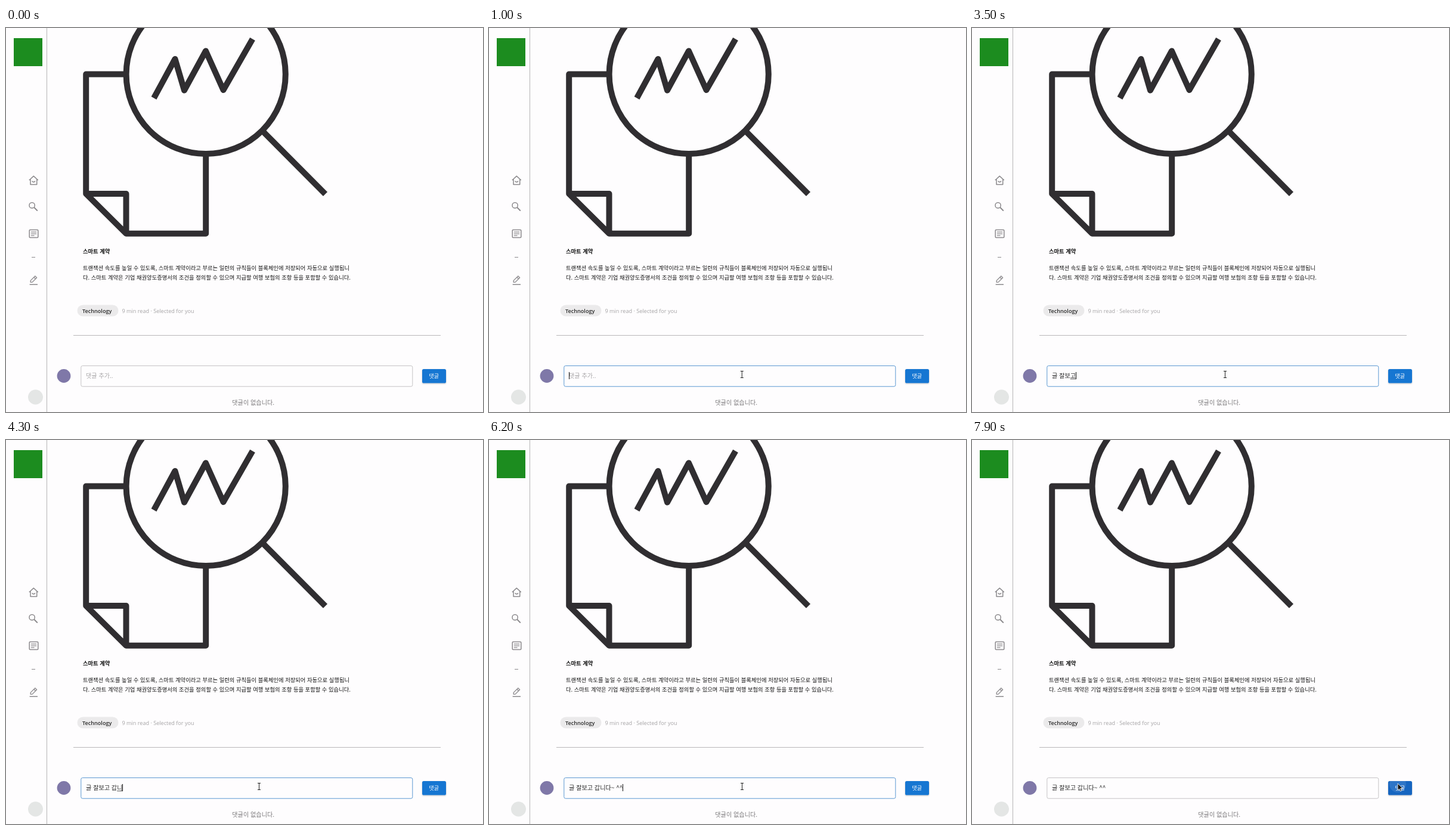
These frames come from a looping animation (800 by 644 pixels, 8 s). An HTML page:

```html
<!DOCTYPE html>
<html lang="ko">
<head>
<meta charset="utf-8">
<style>
  html, body { margin: 0; width: 100%; height: 100%; overflow: hidden; background: #fefdfe; }
  svg { display: block; font-family: "Noto Sans CJK KR", "Noto Sans CJK", sans-serif; }
  text { white-space: pre; }
  .latin { font-family: "Open Sans", "Noto Sans", sans-serif; font-size: 9.1px; }
  .body { font-size: 9.3px; fill: #111; }
  .field { font-size: 10.12px; }
  .art { fill: none; stroke: #302e31; stroke-width: 10; stroke-linejoin: round; }
  .icons { fill: none; stroke: #8b898c; stroke-width: 1.5; stroke-linejoin: round; }
</style>
</head>
<body>
<svg width="800" height="644" viewBox="0 0 800 644">
  <defs>
    <clipPath id="buttonClip"><rect x="698" y="572" width="40" height="23.5" rx="2.6"/></clipPath>
    <filter id="shadow" x="-20%" y="-20%" width="140%" height="160%">
      <feDropShadow dx="0" dy="1" stdDeviation=".8" flood-opacity=".25"/>
    </filter>
  </defs>

  <!-- sidebar -->
  <path d="M68.5 0V644" stroke="#b5b3b5"/>
  <rect x="13" y="17" width="48" height="47" fill="#1c8c1f"/>
  <g class="icons">
    <path d="M38.8 255.3 46.3 248.4 53.8 255.3M41 254V262.6H51.7V254M43.7 256.8Q46.3 260.3 49 256.8"/>
    <circle cx="43.6" cy="297.4" r="4.6"/>
    <path d="M47 300.8 52.8 306.6" stroke-width="2"/>
    <rect x="39.2" y="338.5" width="14.6" height="13" rx="1.2"/>
    <path d="M41.8 342.2H51.2M41.8 345.2H51.2M41.8 348.2H47.6" stroke-width="1.3"/>
    <path d="M43 384.5H49" stroke-width="1"/>
    <path d="M41.2 426.4V423.6L48.8 416 51.6 418.8 44 426.4ZM46.8 418 49.6 420.8" stroke-width="1.3"/>
    <path d="M39.6 430.2H53"/>
  </g>
  <circle cx="49.5" cy="619" r="12.5" fill="#e4e6e5"/>

  <!-- article -->
  <g class="art">
    <circle cx="335.2" cy="77.5" r="133.6"/>
    <path d="M202 77.5H134.2V278H201.5V344.8H335.2V211M134.2 278 201.5 344.8"/>
    <path d="M431.5 174 535.5 278.5"/>
    <path d="M248 117.5 283.5 52 299 104.5 335 38.5 364.5 104 413.5 18.5"/>
  </g>
  <text class="body" x="129" y="378" font-weight="700">스마트 계약</text>
  <text class="body" x="129" y="405.8">트랜잭션 속도를 높일 수 있도록, 스마트 계약이라고 부르는 일련의 규칙들이 블록체인에 저장되어 자동으로 실행됩니</text>
  <text class="body" x="129" y="422">다. 스마트 계약은 기업 채권양도증명서의 조건을 정의할 수 있으며 지급할 여행 보험의 조항 등을 포함할 수 있습니다.</text>
  <rect x="119.5" y="464.5" width="69" height="19" rx="9.5" fill="#ebeaeb"/>
  <text class="latin" x="128" y="477.8" font-weight="600" fill="#2b2b2b">Technology</text>
  <text class="latin" x="194.5" y="477.8" fill="#a5a3a5">9 min read · Selected for you</text>
  <path d="M113 515.5H729" stroke="#b9b7b9"/>

  <!-- comment form -->
  <circle cx="97" cy="583.5" r="11.4" fill="#7f78a8"/>
  <rect id="box" x="125.8" y="566.5" width="556" height="34.7" rx="2.6" fill="none"/>
  <text id="hint" class="field" x="134" y="587" fill="#a7a5a7">댓글 추가..</text>
  <text id="typed" class="field" x="134" y="587" fill="#262626"></text>
  <path id="underline" stroke="#262626" stroke-width=".8"/>
  <path id="caret" stroke="#111"/>
  <rect id="button" x="698" y="572" width="40" height="23.5" rx="2.6" filter="url(#shadow)"/>
  <circle id="ripple" cx="714" cy="577" fill="#fff" opacity=".1" clip-path="url(#buttonClip)"/>
  <text x="717.8" y="587" font-size="9" font-weight="500" fill="#fff" text-anchor="middle">댓글</text>
  <text class="field" x="414.7" y="632.3" fill="#7a787a" text-anchor="middle">댓글이 없습니다.</text>

  <!-- pointers, hot spot at 0,0 -->
  <path id="beam" d="M-2.5-5.5H2.5M-2.5 5.5H2.5M0-5.5V5.5" fill="none" stroke="#222"/>
  <path id="arrow" d="M0 0V11.5L2.7 9 4.5 13 6.4 12.2 4.6 8.3H8.2Z" fill="#111" stroke="#fff" stroke-width=".8"/>
</svg>
<script>
  const LOOP = 8000, FOCUS = 900, CLICK = 7800, BLINK = 600, LEFT = 134;
  const $ = id => document.getElementById(id);

  // time, settled text, syllable being composed
  const keys = [
    [0, '', ''], [1700, '', 'ㄱ'], [2200, '', '그'], [2400, '', '글'], [2500, '글 ', ''],
    [2900, '글 ', 'ㅈ'], [3000, '글 ', '자'], [3100, '글 ', '잘'], [3200, '글 ', '잛'],
    [3300, '글 잘', '보'], [3400, '글 잘', '복'], [3500, '글 잘보', '고'],
    [3700, '글 잘보고 ', ''], [3800, '글 잘보고 ', 'ㄱ'], [3900, '글 잘보고 ', '가'],
    [4000, '글 잘보고 ', '갑'], [4200, '글 잘보고 갑', 'ㄴ'], [4300, '글 잘보고 갑', '니'],
    [4400, '글 잘보고 갑', '닏'], [4500, '글 잘보고 갑니', '다'], [4800, '글 잘보고 갑니다~', ''],
    [5600, '글 잘보고 갑니다~ ', ''], [6100, '글 잘보고 갑니다~ ^', ''], [6200, '글 잘보고 갑니다~ ^^', '']
  ];

  // time, x, y of the pointer
  const path = [
    [100, 520, 620], [400, 468, 596], [800, 424, 581], [1200, 424.5, 581], [7000, 424.5, 581],
    [7100, 455, 583], [7300, 591.5, 587], [7500, 690, 583], [7700, 714, 576], [8000, 714, 576]
  ];

  function pointerAt(t) {
    const i = Math.max(1, path.findIndex(p => p[0] >= t));
    const [a, b] = [path[i - 1], path[i]];
    const k = Math.max(0, (t - a[0]) / (b[0] - a[0]));
    return [a[1] + (b[1] - a[1]) * k, a[2] + (b[2] - a[2]) * k];
  }

  const show = (el, on) => el.setAttribute('visibility', on ? 'visible' : 'hidden');

  function measure(text) {
    $('typed').textContent = text;
    return text ? $('typed').getComputedTextLength() : 0;
  }

  function draw(t) {
    const [x, y] = pointerAt(t);
    const inBox = x > 126 && x < 682 && y > 566 && y < 601;
    const onButton = x > 698 && x < 738 && y > 572 && y < 596;
    const focused = t >= FOCUS && t < CLICK;
    const [since, settled, composing] = keys.findLast(k => k[0] <= t);

    const start = LEFT + measure(settled);
    const end = LEFT + measure(settled + composing);
    show($('hint'), !(settled + composing));
    show($('underline'), composing);
    $('underline').setAttribute('d', `M${start} 588.6H${end}`);
    const blink = Math.floor((t - Math.max(FOCUS, since)) / BLINK) % 2;
    show($('caret'), focused && !blink);
    $('caret').setAttribute('d', `M${Math.round(end) + .5} 577V589`);

    const hovered = inBox && t >= 100;
    $('box').setAttribute('stroke', focused ? '#5b98d2' : hovered ? '#333' : '#c5c3c5');
    $('button').setAttribute('fill', onButton ? '#1565c0' : '#1976d2');
    $('ripple').setAttribute('r', t < CLICK ? 0 : 6 + (t - CLICK) * .08);

    show($('beam'), t >= 100 && inBox);
    show($('arrow'), t >= 100 && !inBox);
    for (const id of ['beam', 'arrow']) $(id).setAttribute('transform', `translate(${x} ${y})`);
  }

  const began = performance.now();
  function tick() {
    const t = (performance.now() - began) % LOOP;
    draw(Math.floor(t / 100) * 100);
    requestAnimationFrame(tick);
  }
  tick();
</script>
</body>
</html>
```
